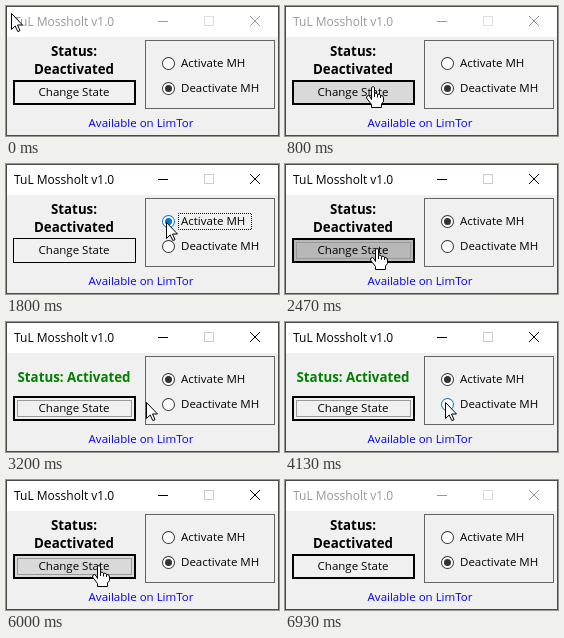
An HTML page with a canvas for the animation above (7000 ms loop, 273x130 px).

```html
<!DOCTYPE html>
<html lang="en">
<head>
<meta charset="utf-8">
<title>Window demo</title>
<style>
  html, body { margin: 0; width: 100%; height: 100%; overflow: hidden; background: #f0f0f0; }
  canvas { display: block; width: 273px; height: 130px; }
</style>
</head>
<body>
<canvas id="stage" width="273" height="130"></canvas>
<script>
const ctx = document.getElementById('stage').getContext('2d');
const LOOP = 7000;
const FACE = '"Open Sans", "Noto Sans", sans-serif';
const BLUE = '#0078d7';

// Pointer stops: time, x, y
const PATH = [
  [0, 5, 7], [400, 47, 42], [730, 87, 79], [800, 88, 80], [870, 90, 80],
  [1470, 161, 58], [1530, 160, 58], [1930, 160, 58], [2400, 92, 84],
  [2870, 92, 84], [3200, 140, 80], [3600, 156, 79], [3930, 160, 80],
  [4130, 160, 80], [4530, 160, 80], [4800, 126, 82], [5070, 93, 85],
  [5930, 93, 85], [6000, 93, 85], [6400, 100, 132], [7000, 100, 160]
];

const ARROW = new Path2D('M.5 .5V16.5L4.2 13L6.8 18.6L9 17.6L6.5 12H11.5Z');
const HAND = new Path2D('M-1.5 13.5V1.5Q0 -.5 1.5 1.5V7.5Q3.5 6 4.5 8.5Q6.5 7 7.5 9.5' +
  'Q10.5 9 10.5 12V15.5L8.5 18V21.5H-1.5V18.5L-6.5 12Q-6.5 9.5 -4.5 9.5Q-3 10 -1.5 13.5Z');
const KNUCKLES = new Path2D('M1.5 7.5V11M4.5 8.5V11.5M7.5 9.5V12');

function pointerAt(t) {
  const i = Math.max(1, PATH.findIndex(p => p[0] > t));
  const [t0, x0, y0] = PATH[i - 1];
  const [t1, x1, y1] = PATH[i];
  const u = (t - t0) / (t1 - t0);
  return { x: Math.round(x0 + (x1 - x0) * u), y: Math.round(y0 + (y1 - y0) * u) };
}

const between = (t, a, b) => t >= a && t < b;
const inside = (p, x, y, w, h) => p.x >= x && p.x < x + w && p.y >= y && p.y < y + h;

function fill(x, y, w, h, color) {
  ctx.fillStyle = color;
  ctx.fillRect(x, y, w, h);
}

function frame(x, y, w, h, color, line = 1) {
  ctx.strokeStyle = color;
  ctx.lineWidth = line;
  ctx.strokeRect(x + line / 2, y + line / 2, w - line, h - line);
}

function dottedFrame(x, y, w, h) {
  ctx.setLineDash([1, 1]);
  ctx.lineDashOffset = 0.5;
  frame(x, y, w, h, '#000');
  ctx.setLineDash([]);
}

function label(text, x, y, color = '#000', align = 'left', font = '11.5px ') {
  ctx.font = font + FACE;
  ctx.textAlign = align;
  ctx.fillStyle = color;
  ctx.fillText(text, x, y);
}

function disc(x, y, r, color) {
  ctx.beginPath();
  ctx.arc(x, y, r, 0, Math.PI * 2);
  ctx.fillStyle = color;
  ctx.fill();
}

function titleBar(active) {
  const ink = active ? '#000' : '#999';
  fill(0, 0, 273, 31, '#fff');
  label('TuL Mossholt v1.0', 8, 20, ink, 'left', '12px ');
  fill(152, 15, 10, 1, ink);
  frame(198, 10, 10, 10, active ? '#ccc' : '#ddd');
  ctx.strokeStyle = ink;
  ctx.lineWidth = 1;
  ctx.beginPath();
  ctx.moveTo(244, 10);
  ctx.lineTo(254, 20);
  ctx.moveTo(254, 10);
  ctx.lineTo(244, 20);
  ctx.stroke();
}

function status(on) {
  const bold = 'bold 13.3px ';
  if (on) {
    label('Status: Activated', 68, 60, '#008000', 'center', bold);
  } else {
    label('Status:', 68, 50, '#000', 'center', bold);
    label('Deactivated', 68, 68, '#000', 'center', bold);
  }
}

function button(hover, down, focused, cue) {
  fill(7, 74, 123, 25, down ? '#b8b8b8' : hover ? '#d9d9d9' : '#f0f0f0');
  frame(7, 74, 123, 25, '#000', focused ? 2 : 1);
  if (cue) frame(11, 78, 115, 17, '#999');
  label('Change State', 68, 90, '#000', 'center');
}

function radio(text, y, width, checked, hover, down, focused) {
  const ink = hover ? BLUE : '#333';
  disc(162.5, y + 0.5, 6.5, ink);
  disc(162.5, y + 0.5, 5.5, down ? '#cce4f7' : '#fff');
  if (checked) disc(162.5, y + 0.5, 3.5, ink);
  label(text, 175, y + 4);
  if (focused) dottedFrame(172, y - 8, width, 17);
}

function pointer(p, hand) {
  ctx.save();
  ctx.translate(p.x, p.y);
  ctx.lineWidth = 1;
  ctx.lineJoin = 'round';
  ctx.fillStyle = '#fff';
  ctx.strokeStyle = '#000';
  const shape = hand ? HAND : ARROW;
  ctx.fill(shape);
  ctx.stroke(shape);
  if (hand) ctx.stroke(KNUCKLES);
  ctx.restore();
}

function draw(t) {
  const p = pointerAt(t);
  const active = between(t, 1670, 6930);
  const first = between(t, 1670, 2470);
  const second = between(t, 4270, 5470);
  const checkedFirst = between(t, 1800, 4330);
  const overButton = inside(p, 7, 74, 123, 25);
  const overLink = inside(p, 82, 109, 107, 17);

  fill(0, 0, 273, 130, '#f0f0f0');
  titleBar(active);
  frame(0, 0, 273, 130, '#4a4a4a');
  status(between(t, 2530, 5530));
  button(overButton, between(t, 2470, 2530) || between(t, 5470, 5530),
    !first && !second, active && !first && !second);
  frame(139, 34, 130, 69, '#646464');
  radio('Activate MH', 57, 74, checkedFirst, inside(p, 156, 48, 90, 18),
    between(t, 1670, 1800), first);
  radio('Deactivate MH', 82, 86, !checkedFirst, inside(p, 156, 73, 102, 18),
    between(t, 4270, 4330), second);
  label('Available on LimTor', 135, 121, '#00f', 'center');
  pointer(p, overButton || overLink);
}

// The picture advances fifteen times a second, on 10 ms marks
function tick() {
  const t = performance.now() % LOOP;
  const step = Math.floor((t + 3.4) * 3 / 200);
  draw(Math.round(step * 20 / 3) * 10 % LOOP);
  requestAnimationFrame(tick);
}
tick();
</script>
</body>
</html>
```
